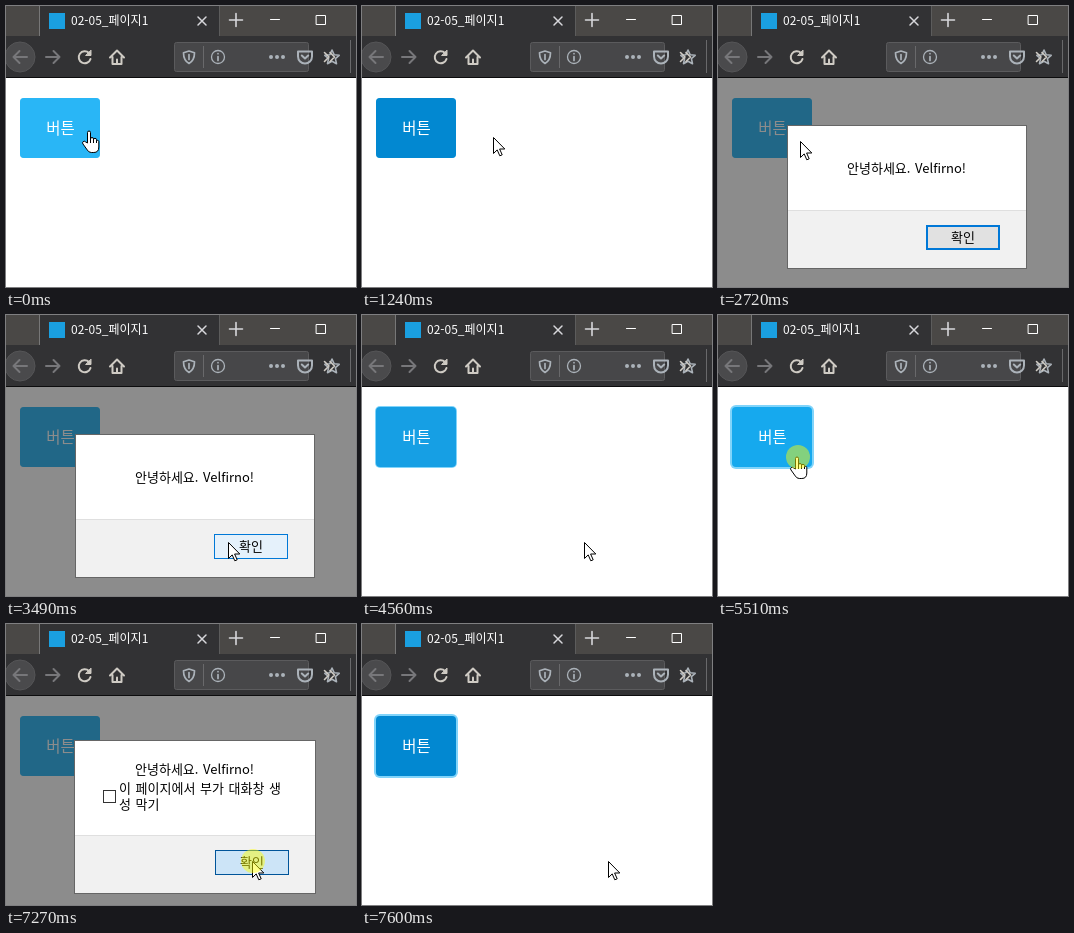
Write an HTML page that moves like this. It is 350 by 281 pixels and loops after 7830 ms.

```html
<!DOCTYPE html>
<html lang="ko">
<head>
<meta charset="utf-8">
<title>페이지1</title>
<style>
  html, body { margin: 0; width: 100%; height: 100%; overflow: hidden; background: #fff; }
  svg { display: block; width: 350px; height: 281px; }
  text { font: 13px "Noto Sans CJK KR", "Noto Sans CJK", "Noto Sans", sans-serif; word-spacing: 1px; }
  .line { fill: none; stroke-width: 2; stroke-linecap: round; stroke-linejoin: round; }
  .mid { text-anchor: middle; }
</style>
</head>
<body>
<svg viewBox="0 0 350 281">
  <!-- page -->
  <rect id="ring" fill="#81d4fa"/>
  <rect id="button" x="14" y="92" width="80" height="60" rx="4"/>
  <text class="mid" x="54.5" y="127.5" fill="#fff" style="font-size:15.5px">버튼</text>
  <rect id="shade" y="72" width="350" height="209" fill="#1a1a1a" opacity=".5"/>

  <!-- browser window -->
  <path fill="#4a4846" d="M0 0h350v30H0z"/>
  <path fill="#323234" d="M34 0h180v30h136v41H0V30h34z"/>
  <path fill="#0c0c0d" d="M0 71h350v1H0z"/>
  <path fill="#777" d="M33 0h1v30h-1z"/>
  <path fill="#5c5c5c" d="M213 0h1v30h-1z"/>
  <rect x="43" y="7" width="16" height="16" fill="#1a9fe0"/>
  <text x="65" y="19" fill="#fff" style="font-size:12px;word-spacing:0">02-05_페이지1</text>
  <g class="line" stroke="#d7d7db">
    <path stroke-width="1.5" d="M192 11l8 8m0-8l-8 8"/>
    <path stroke-width="1.6" d="M230 7.5v13M223.500 14h13"/>
    <path stroke="#fff" stroke-width="1" d="M264.500 13.500h9M310.500 9.500h9v9h-9z"/>
  </g>
  <circle cx="14" cy="51" r="15" fill="#4a4a4c" stroke="#555557"/>
  <g class="line" stroke="#77777a">
    <path d="M21 51H7.500m6-6l-6 6 6 6"/>
    <path d="M40 51h13.500m-6-6l6 6-6 6"/>
  </g>
  <g class="line" stroke="#cfcbc4">
    <path d="M84.500 53a6 6 0 1 1-1.500-6"/>
    <path fill="#cfcbc4" stroke-width="1" d="M85 44.500v5h-5z"/>
    <path d="M104 51.500l7-7 7 7M106.500 51v7h9v-7M111 57.500v-4"/>
  </g>
  <rect x="168.500" y="36.500" width="134" height="29" rx="2" fill="#474749" stroke="#5b5b5d"/>
  <path fill="#69696b" d="M197 40h1v22h-1zM344 34h1v33h-1z"/>
  <g class="line" stroke="#abb2b9">
    <path stroke-width="1.7" d="M183 45l5.500 1.700c0 5-1.500 8.500-5.500 10.800-4-2.300-5.500-5.800-5.500-10.800zM183 48.500v5"/>
    <circle cx="212" cy="51" r="6.500" stroke-width="1.300"/>
    <path stroke-width="1.700" d="M212 50.500v4M212 47.600v.1"/>
    <path stroke-width="4" d="M265 51h.01M271 51h.01M277 51h.01"/>
    <path d="M292 45.500h14v5a7 7 0 0 1-14 0zM295.800 49.500l3.200 3 3.200-3"/>
    <path stroke-width="1.600" d="M326 44l2.100 4.700 5.100.6-3.800 3.400 1.100 5-4.500-2.500-4.500 2.500 1.100-5-3.800-3.400 5.100-.6z"/>
    <path stroke="#cfcbc4" stroke-width="1.600" d="M318.500 46.500l4.500 4.500-4.500 4.500M324 46.500l4.500 4.500-4.500 4.500"/>
  </g>

  <!-- alert boxes -->
  <g id="first">
    <rect x="69.500" y="119.500" width="239" height="143" fill="#fff" stroke="#666"/>
    <path fill="#f1f1f1" d="M70 205h238v57H70z"/>
    <path fill="#dfdfdf" d="M70 204h238v1H70z"/>
    <text x="129" y="167">안녕하세요. Velfirno!</text>
  </g>
  <g id="second">
    <rect x="68.500" y="116.500" width="241" height="153" fill="#fff" stroke="#666"/>
    <path fill="#f1f1f1" d="M69 212h240v57H69z"/>
    <path fill="#dfdfdf" d="M69 211h240v1H69z"/>
    <text x="129" y="150">안녕하세요. Velfirno!</text>
    <rect x="97.500" y="166.500" width="12" height="12" fill="#fff" stroke="#333"/>
    <text x="113" y="169">이 페이지에서 부가 대화창 생</text>
    <text x="113" y="185">성 막기</text>
  </g>
  <g id="ok">
    <rect id="okBox"/>
    <text class="mid" x="37" y="17">확인</text>
  </g>

  <!-- pointer -->
  <g id="pointer" stroke="#000" fill="#fff" stroke-linejoin="round">
    <path id="arrow" d="M.5.5v16l3.700-3.600 2.600 5.900 2.400-1-2.600-5.800h5.200z"/>
    <path id="hand" d="M-1.500 12V1.500a1.500 1.500 0 0 1 3 0V8a1.500 1.500 0 0 1 3 0v.8a1.500 1.500 0 0 1 3 0v1a1.300 1.300 0 0 1 2.300.7V16q0 5.500-5 5.500h-2.500q-2.500 0-4-2.500l-4.300-6a1.600 1.600 0 0 1 2.400-2.200zM1.500 8v4M4.500 8.500V12M7.500 9.500V12"/>
    <circle id="click" cx="1" r="12" fill="#ff0" stroke="none" opacity=".47"/>
  </g>
</svg>
<script>
// The screen refreshes in equal ticks; all times below are ticks.
const LOOP = 7830, TICKS = 101, LEAD = 20;

const HOME = [83, 125];
const moves = [
  { from: 3, to: 5, at: [142, 138] },
  { from: 6, to: 7, at: [138, 137] },
  { from: 14, to: 16, at: [131, 131] },
  { from: 19, to: 24, at: [82, 135] },
  { from: 38, to: 41, at: [213, 216] },
  { from: 43, to: 45, at: [222, 227] },
  { from: 59, to: 65, at: [79, 142] },
  { from: 81, to: 86, at: [246, 237] }
];
const clicks = [31, 57, 70, 94];
const alerts = [
  { id: 'first', from: 33, to: 59, ok: [208, 219] },
  { id: 'second', from: 72, to: 97, ok: [209, 226] }
];
const NORMAL = [2, 136, 209], HOVER = [41, 182, 246], PRESSED = [3, 155, 229];

const el = id => document.getElementById(id);
const set = (id, attrs) => { for (const k in attrs) el(id).setAttribute(k, attrs[k]); };
const show = (id, on) => set(id, { visibility: on ? 'visible' : 'hidden' });
const smooth = u => u * u * (3 - 2 * u);
const mix = (a, b, u) => a.map((v, i) => Math.round(v + (b[i] - v) * u));
const inside = ([x, y], [left, top], w, h) =>
  x >= left && x < left + w && y >= top && y < top + h;

const pointerAt = n => moves.reduce((pos, m) =>
  mix(pos, m.at, smooth(Math.min(1, Math.max(0, (n - m.from) / (m.to - m.from))))), HOME);
const alertAt = n => alerts.find(a => n >= a.from && n < a.to);
const clickAt = n => clicks.some(c => n >= c && n < c + 2);
const overButton = n => inside(pointerAt(n), [14, 92], 80, 60);

function buttonColor(n) {
  if (alertAt(n)) return HOVER;
  if (!overButton(n)) return NORMAL;
  return clickAt(n) && clickAt(n - 1) ? PRESSED : HOVER;
}
const focusRing = n => n > clicks[0] && !alertAt(n) ? 2 : 0;

function draw(n) {
  const pos = pointerAt(n), alert = alertAt(n), clicking = clickAt(n);

  // Transitions last two ticks, so each tick averages itself with the one before.
  const spread = (focusRing(n) + focusRing(n - 1)) / 2;
  set('ring', {
    x: 14 - spread, y: 92 - spread, rx: 4 + spread,
    width: 80 + 2 * spread, height: 60 + 2 * spread
  });
  set('button', { fill: `rgb(${mix(buttonColor(n - 1), buttonColor(n), .5)})` });

  show('shade', alert);
  show('ok', alert);
  for (const a of alerts) show(a.id, a === alert);
  if (alert) {
    const over = inside(pos, alert.ok, 74, 25);
    const border = over ? 1 : 2;
    set('ok', { transform: `translate(${alert.ok})` });
    set('okBox', {
      x: border / 2, y: border / 2, width: 74 - border, height: 25 - border,
      'stroke-width': border,
      stroke: over && clicking ? '#005499' : '#0078d7',
      fill: !over ? '#e1e1e1' : clicking ? '#cce4f7' : '#e5f1fb'
    });
  }

  const pointing = !alert && overButton(n);
  set('pointer', { transform: `translate(${pos})` });
  show('hand', pointing);
  show('arrow', !pointing);
  show('click', clicking);
}

const start = performance.now();
function frame() {
  const t = (performance.now() - start) % LOOP;
  draw(Math.min(TICKS - 1, Math.floor((t + LEAD) / LOOP * TICKS)));
  requestAnimationFrame(frame);
}
frame();
</script>
</body>
</html>
```
